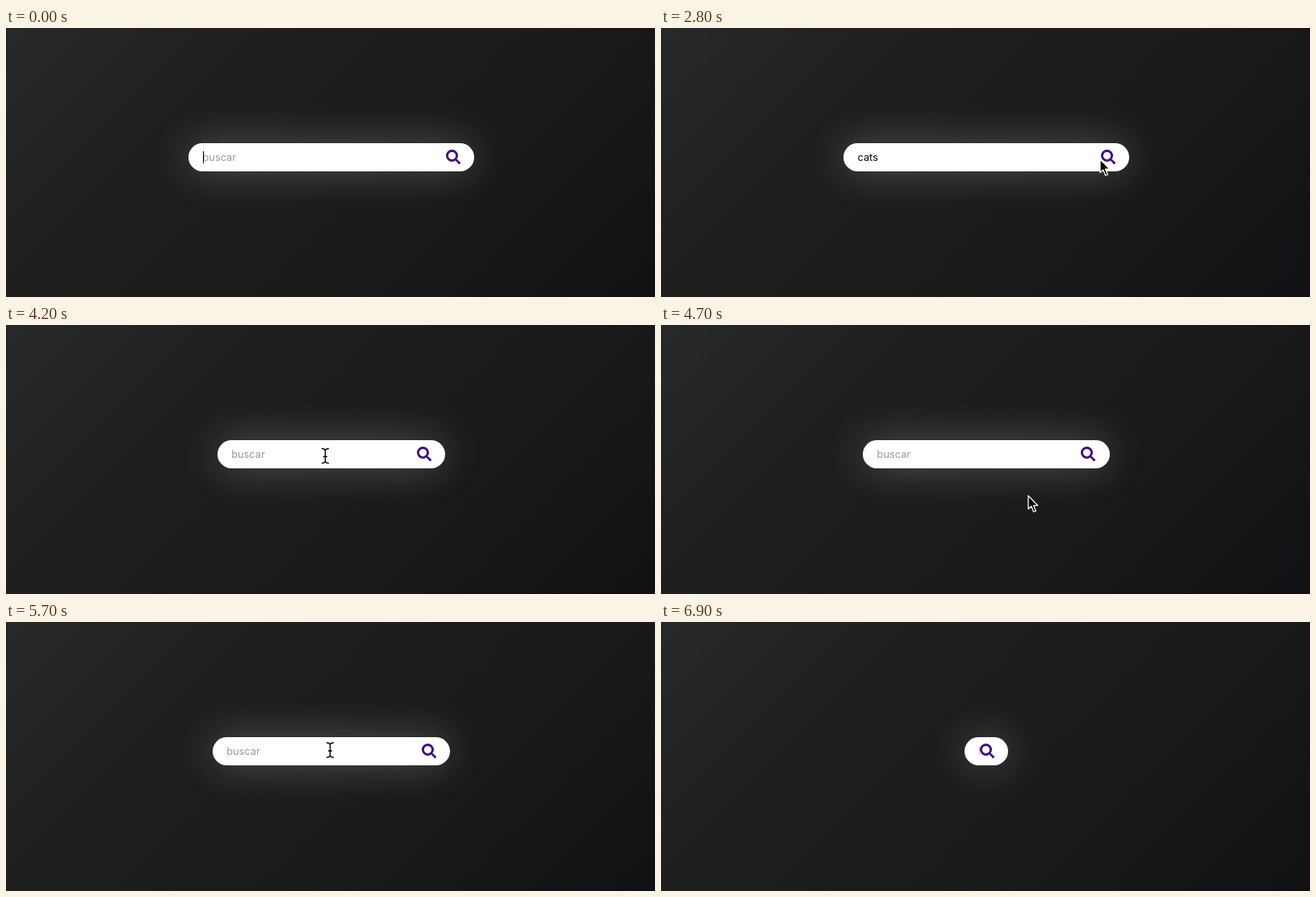
Animation, 804 px wide and 334 px high, one loop 7.3 s. Source, as an HTML page:

```html
<!DOCTYPE html>
<html lang="es">
<head>
<meta charset="utf-8">
<title>Buscador</title>
<style>
  html, body { margin: 0; width: 100%; height: 100%; overflow: hidden; }
  body {
    position: relative;
    background: linear-gradient(135deg, #27282a 0, #1f1f1f 28%, #1b1b1c 58%, #111113 100%);
  }
  #pill {
    position: absolute; top: 143px; height: 35px; border-radius: 17.5px;
    background: #fff; box-shadow: 0 0 50px rgba(255, 255, 255, .26);
  }
  #field {
    position: absolute; left: 17.5px; right: 36px; top: 0; height: 35px;
    overflow: hidden; white-space: nowrap; color: #000;
    font: 12.8px/36px Inter, "Open Sans", sans-serif;
  }
  #hint { color: #999; }
  #caret { position: absolute; top: 10px; width: 1.4px; height: 15px; background: #000; }
  #lens { position: absolute; right: 17px; top: 8.3px; width: 18.5px; height: 18.5px; }
  #cursor { position: absolute; left: 0; top: 0; width: 1px; height: 1px; overflow: visible; }
</style>
</head>
<body>
<div id="pill">
  <div id="field"><span id="typed"></span><i id="caret"></i><span id="hint">buscar</span></div>
  <svg id="lens" viewBox="0 0 512 512" fill="none" stroke="#430a80">
    <circle cx="208" cy="208" r="168" stroke-width="80"/>
    <path d="M350 350L468 468" stroke-width="76"/>
    <path d="M452 480L480 452" stroke-width="44" stroke-linejoin="round" stroke-linecap="round"/>
  </svg>
</div>
<svg id="cursor">
  <path id="arrow" d="M0 0V16.6L3.8 13.1L6.6 20L9.4 18.8L6.5 12.1H11.8Z" stroke="#fff" stroke-width="1.3" stroke-linejoin="round"/>
  <g id="beam" fill="none" stroke-linecap="round">
    <path id="stem" d="M-4-9Q0-9 0-6Q0-9 4-9M0-6V6M-4 9Q0 9 0 6Q0 9 4 9M-2 1H2" stroke="#fff" stroke-width="2.6"/>
    <use href="#stem" style="stroke:#000"/>
    <path d="M-4-9Q0-9 0-6Q0-9 4-9M0-6V6M-4 9Q0 9 0 6Q0 9 4 9M-2 1H2" stroke="#000" stroke-width="1.4"/>
  </g>
</svg>
<script>
const LOOP = 7300, TICK = 100, CENTER = 403, CLOSED = 54, OPEN = 354, SLIDE = 800;
const $ = id => document.getElementById(id);
$('beam').querySelector('use').remove();

// Start time, width before, width after
const slides = [[3830, CLOSED, OPEN], [4590, OPEN, CLOSED], [5300, CLOSED, OPEN], [6045, OPEN, CLOSED]];
const typing = [[0, ''], [900, 'c'], [1000, 'ca'], [1200, 'cat'], [1300, 'cats'], [4000, '']];
const caretOn = [[0, 300], [800, 1800], [2300, 2400]];
// Time, x, y of the pointer's hot spot
const route = [
  [1600, 330, 164], [2300, 544, 163], [3100, 544, 163], [3300, 575, 161], [3900, 374, 161],
  [4200, 395.5, 162.5], [4500, 425, 168], [4600, 436, 184], [4700, 455, 212],
  [4900, 482, 228], [5100, 487, 222], [5300, 424, 176], [5400, 405, 166], [6000, 398, 152]
];

const latest = (list, t) => list.filter(step => step[0] <= t).pop();

// cubic-bezier(.25, .1, .25, 1)
function ease(p) {
  if (p <= 0 || p >= 1) return p <= 0 ? 0 : 1;
  const curve = (s, a, b) => 3 * s * (1 - s) * (1 - s) * a + 3 * s * s * (1 - s) * b + s ** 3;
  let low = 0, high = 1;
  for (let i = 0; i < 24; i++) {
    const mid = (low + high) / 2;
    if (curve(mid, .25, .25) < p) low = mid; else high = mid;
  }
  return curve(low, .1, 1);
}

function pillWidth(t) {
  if (t < 4000) return OPEN;
  const [start, from, to] = latest(slides, t);
  return from + (to - from) * ease((t - start) / SLIDE);
}

function pointerAt(t) {
  const next = route.findIndex(stop => stop[0] >= t);
  if (t < route[0][0] || next < 0) return null;
  const [t1, x1, y1] = route[next], [t0, x0, y0] = route[Math.max(0, next - 1)];
  const p = t1 > t0 ? (t - t0) / (t1 - t0) : 1;
  return [x0 + (x1 - x0) * p, y0 + (y1 - y0) * p];
}

function draw(t) {
  const width = pillWidth(t), left = CENTER - width / 2;
  $('pill').style.left = left + 'px';
  $('pill').style.width = width + 'px';

  const text = latest(typing, t)[1];
  $('typed').textContent = text;
  $('hint').style.display = text ? 'none' : '';
  $('caret').style.display = caretOn.some(([on, off]) => t >= on && t < off) ? '' : 'none';

  const pointer = pointerAt(t);
  $('cursor').style.display = pointer ? '' : 'none';
  if (!pointer) return;
  const [x, y] = pointer;
  const overField = x > left && x < left + width - 37 && y > 143 && y < 178;
  $('arrow').style.display = overField ? 'none' : '';
  $('beam').style.display = overField ? '' : 'none';
  $('cursor').style.transform = `translate(${x}px, ${y}px)`;
}

function frame() {
  const t = performance.now() % LOOP;
  draw(Math.floor(t / TICK) * TICK);
  requestAnimationFrame(frame);
}
frame();
</script>
</body>
</html>
```
